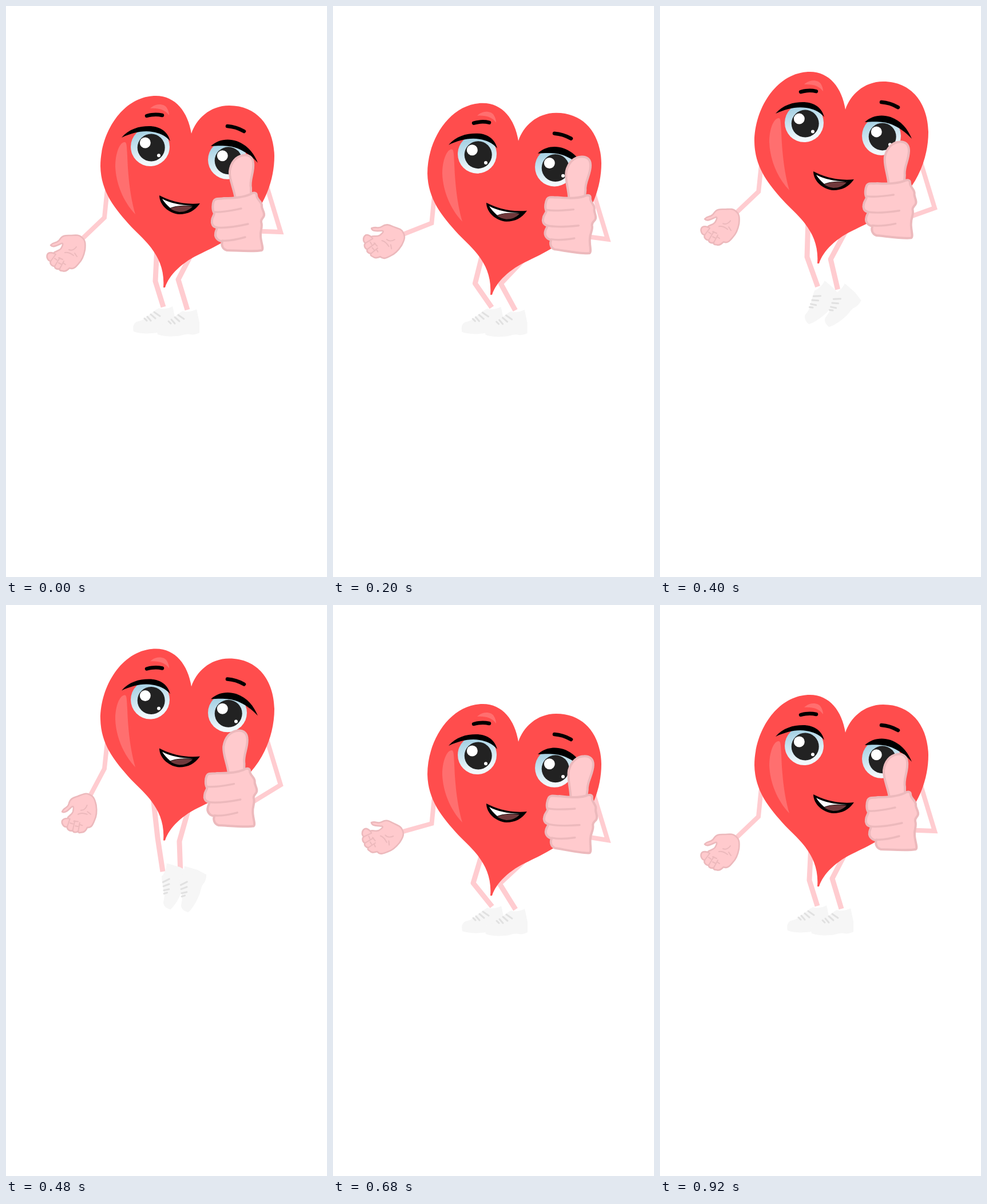
Recreate the animation shown at these times as an HTML page. Size 561 px wide and 998 px high, loop 1.2 s.

```html
<!DOCTYPE html>
<html lang="en">
<head>
<meta charset="utf-8">
<title>Jumping heart</title>
<style>
  html, body { margin: 0; width: 100%; height: 100%; overflow: hidden; background: #fff; }
  svg { display: block; width: 561px; height: 998px; }
  .limb { fill: none; stroke: #ffccd0; stroke-width: 8; }
  .leg { stroke-width: 9; stroke-linejoin: round; }
  .skin { fill: #ffcacd; stroke: #ecb9bc; stroke-linejoin: round; stroke-linecap: round; }
  .crease { fill: none; }
  .brow { fill: none; stroke: #000; stroke-width: 6.5; stroke-linecap: round; }
  .lace { fill: none; stroke: #e1e1e1; stroke-width: 3; stroke-linecap: round; }
</style>
</head>
<body>
<svg viewBox="0 0 561 998">
  <defs>
    <linearGradient id="iris" x1="0.2" y1="0" x2="0.45" y2="1">
      <stop offset="0.1" stop-color="#a3d0e3"/>
      <stop offset="0.9" stop-color="#f1f8fc"/>
    </linearGradient>
    <g id="eye">
      <circle r="34" fill="url(#iris)"/>
      <circle cx="1.7" cy="1.5" r="24" fill="#222"/>
      <circle cx="-8.7" cy="-7" r="9.5" fill="#fff"/>
      <circle cx="15" cy="15.3" r="3" fill="#fff"/>
    </g>
    <!-- ankle at 0,0 -->
    <g id="shoe">
      <path fill="#f6f6f6" d="M-52 43C-54 35 -52 29 -47 26C-39 24 -34 22 -30 18C-21 11 -15 6 -8 2C-3 5 12 2 16 -1C18 6 19 14 21 22L21 40C16 43 9 44 5 43C-4 41 -9 46 -20 46C-32 47 -44 46 -52 43Z"/>
      <path class="lace" d="M-33 20L-29 24M-28 17L-22 24M-22 13L-14 20M-16 9L-6 16"/>
    </g>
  </defs>

  <path id="armL" class="limb"/>
  <path id="armR" class="limb"/>
  <path id="legL" class="limb leg"/>
  <path id="legR" class="limb leg"/>
  <use id="shoeL" href="#shoe"/>
  <use id="shoeR" href="#shoe"/>

  <g id="palm" class="skin" stroke-width="2.6">
    <path d="M78 418C84 411 89 416 94 408C99 400 106 401 112 401C120 401 127 399 132 404C139 409 139 416 138 426C136 437 133 444 127 450C122 456 118 461 111 458C108 461 104 465 99 463C95 463 93 462 94 459C90 461 85 459 85 455C80 455 76 450 78 446C72 445 70 437 73 433C76 430 80 431 83 432C86 428 92 429 96 424C99 419 101 414 97 415C90 418 82 423 78 418Z"/>
    <path class="crease" stroke-width="2" d="M94 459L101 446M85 455L94 440M78 446L87 434M83 432L87 434M92 440L99 443M100 449L104 452M85 441L89 444M92 449L96 451M110 426C115 428 120 425 123 421M103 431C109 430 114 433 118 436M120 432L124 438"/>
  </g>

  <g id="body">
    <path fill="#ff4d4d" d="M324 223C318 185 296 157 262 157C205 157 165 220 165 280C166 325 190 354 219 386C246 413 279 440 275 492L278 492C285 470 308 447 342 432C368 419 402 404 428 372C452 345 469 305 469 262C468 212 440 174 390 174C356 174 332 198 324 223Z"/>
    <path fill="#ff6f6f" d="M208 238C199 237 191 257 191 280C192 310 205 342 226 364C216 330 213 290 212 262C211 245 211 239 208 238ZM252 179C262 169 277 171 281 178C284 183 285 187 285 191C278 181 266 178 252 179Z"/>
    <path class="brow" d="M246 192Q260 188 273 191M387 210Q402 211 416 219"/>
    <use href="#eye" x="252" y="246"/>
    <use href="#eye" x="387" y="268.8"/>
    <path d="M202 230C215 215 232 210 250 210C270 210 283 220 287 236C278 226 268 222 256 220C238 217 220 222 202 230Z"/>
    <path d="M358 245C370 233 388 231 403 236C422 243 433 257 440 274C428 261 418 255 405 249C390 243 372 244 358 245Z"/>
    <path d="M268 331C285 340 310 348 339 345C330 358 318 364 303 364C285 363 268 348 268 331Z"/>
    <path fill="#fff" d="M273 337C288 345 308 349 328 348.5C312 349 298 348 287 353C281 348 276 342 273 337Z"/>
    <path fill="#70393c" d="M287 354C297 349 312 348.5 326 350.5C320 357 312 360 303 360C296 359 291 357 287 354Z"/>
  </g>

  <g id="thumb" class="skin" stroke-width="4">
    <path d="M401 336C398 318 390 303 391 289C393 273 402 263 414 261C424 259 431 264 432 274C434 290 425 304 428 318L428 332"/>
    <path d="M363 341C366 335 373 338 381 336C400 336 418 333 427 329C433 325 438 326 438 331C438 338 446 341 447 348C446 355 452 359 451 366C450 371 445 372 446 378C449 386 444 392 445 402C445 412 451 424 447 427C432 430 400 427 386 427C378 425 376 417 378 411C370 411 365 404 366 398C366 393 370 389 368 387C361 386 359 380 360 375C360 369 364 366 364 362C360 356 361 346 363 341Z"/>
    <path class="crease" stroke-width="3.4" d="M365 360C380 361 396 357 411 354M367 387C384 389 405 385 423 381M378 410C390 411 404 408 418 404"/>
  </g>
</svg>

<script>
const el = id => document.getElementById(id);
const LOOP = 1200, STEP = 40;

const stand = {
  dy: 0, elbow: [172, 370], swing: 0,
  hipL: [264, 420], kneeL: [261, 481], ankleL: [275, 526],
  hipR: [331, 420], kneeR: [301, 478], ankleR: [317, 531],
  point: 0, fist: [0, 0], tilt: 0, wrist: [425, 393]
};
const crouch = {
  dy: 16, elbow: [172.5, 382], swing: 28,
  hipL: [264, 423], kneeL: [245, 486], ankleL: [278, 527],
  hipR: [346, 436], kneeR: [291, 487], ankleR: [319, 532],
  point: 0, fist: [9, 1], tilt: 8, wrist: [430, 403]
};
const air = {
  dy: -80.5, elbow: [172, 286], swing: -18.5,
  hipL: [256, 326], kneeL: [265, 407], ankleL: [274, 466],
  hipR: [324, 339], kneeR: [303, 413], ankleR: [305, 471],
  point: -62, fist: [-13, -41.5], tilt: 1.5, wrist: [412, 356]
};

const linear = k => k;
const soften = k => 1 - (1 - k) ** 1.25;
// time, pose, easing towards the next pose
const keys = [
  [0, stand, soften], [280, crouch, linear], [480, air, linear],
  [680, crouch, linear], [920, stand, linear], [LOOP, stand, linear]
];

const mix = (a, b, k) => Array.isArray(a) ? a.map((v, i) => mix(v, b[i], k)) : a + (b - a) * k;

function poseAt(t) {
  const i = keys.findIndex(key => t < key[0]) - 1;
  const [t0, a, ease] = keys[i], [t1, b] = keys[i + 1];
  const k = ease((t - t0) / (t1 - t0));
  const pose = {};
  for (const name in a) pose[name] = mix(a[name], b[name], k);
  return pose;
}

function spin([x, y], deg) {
  const r = deg * Math.PI / 180, c = Math.cos(r), s = Math.sin(r);
  return [x * c - y * s, x * s + y * c];
}

const line = (id, ...pts) => el(id).setAttribute("d", "M" + pts.join("L"));
const place = (id, value) => el(id).setAttribute("transform", value);

function draw(p) {
  const { dy, elbow, swing } = p;
  const hand = spin([-42, 40], swing);
  line("armL", [178, 310 + dy], elbow, [elbow[0] + hand[0], elbow[1] + hand[1]]);
  line("armR", [456, 316 + dy], [480, 395 + dy], p.wrist);
  line("legL", p.hipL, p.kneeL, p.ankleL);
  line("legR", p.hipR, p.kneeR, p.ankleR);
  place("shoeL", `translate(${p.ankleL}) rotate(${p.point})`);
  place("shoeR", `translate(${p.ankleR}) rotate(${p.point})`);
  place("palm", `translate(${elbow}) rotate(${swing}) translate(-172 -370)`);
  place("body", `translate(0 ${dy})`);
  place("thumb", `translate(${p.fist}) rotate(${p.tilt} 405 375)`);
}

const start = performance.now();
function tick() {
  const t = (performance.now() - start) % LOOP;
  draw(poseAt(Math.floor(t / STEP) * STEP));
  requestAnimationFrame(tick);
}
tick();
</script>
</body>
</html>
```
